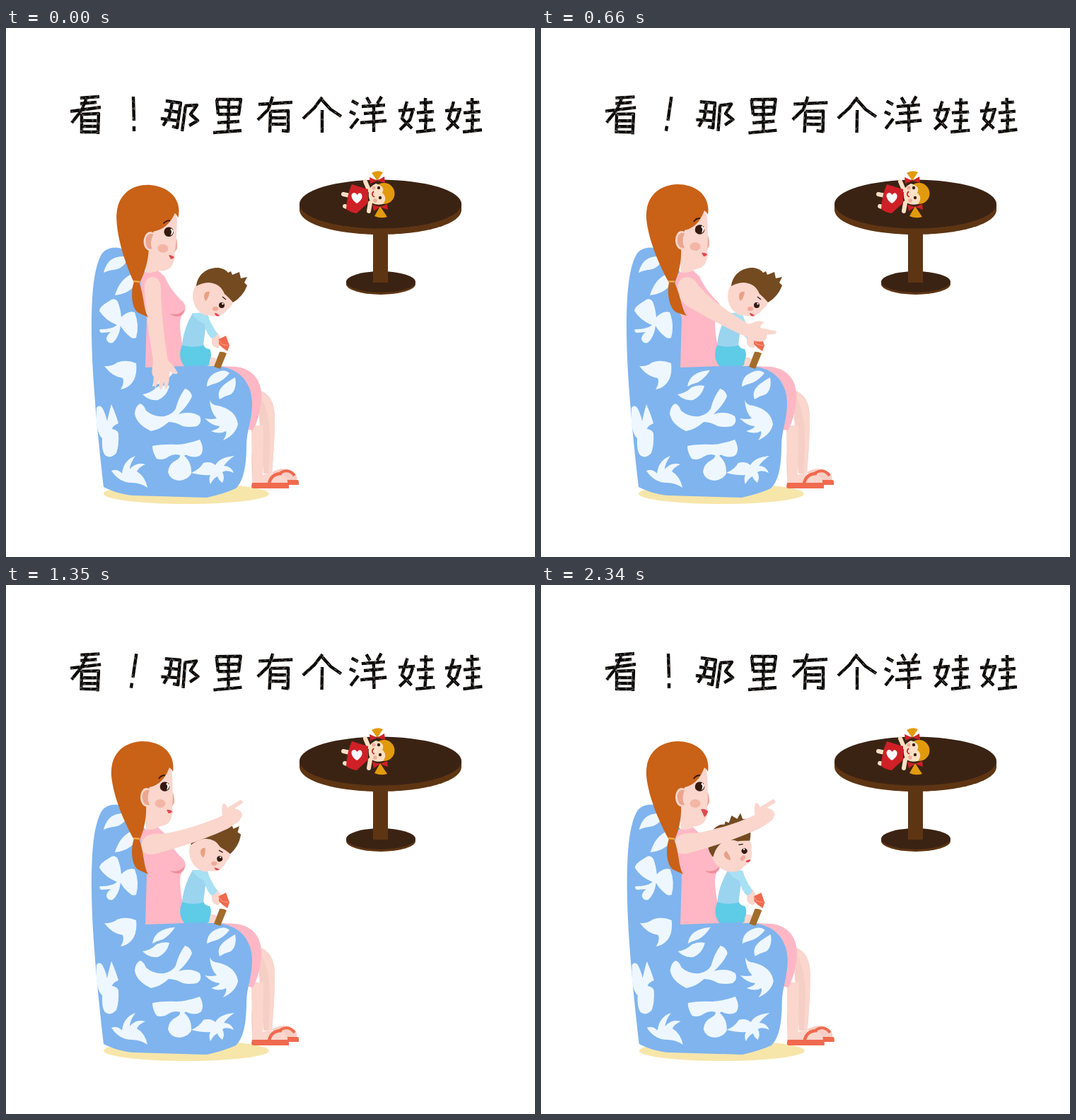
An HTML page for the animation above (2700 ms loop, 748 by 748 pixels).

```html
<!DOCTYPE html>
<html lang="zh">
<head>
<meta charset="utf-8">
<title>看！那里有个洋娃娃</title>
<style>
html, body { margin: 0; width: 100%; height: 100%; overflow: hidden; background: #fff; }
svg { display: block; width: 100vw; height: 100vh; }
.skin { fill: #fad6cd; }
.shade { fill: #f5cfc5; }
.pink { fill: #ffb7c5; }
.hair { fill: #c96117; }
.leaf { fill: #eef7ff; }
.sole { fill: #f06a4e; }
.wood { fill: #5e3513; }
.dark { fill: #3b2314; }
.gold { fill: #e29a0d; }
.red { fill: #cf2027; }
.doll { fill: #fbe0c4; }
.ink { fill: none; stroke: #0b0908; stroke-width: 4.4; stroke-linejoin: round; }
.fleck { fill: none; stroke: #8c847c; stroke-width: .9; }
</style>
</head>
<body>
<svg viewBox="0 0 748 748" role="img" aria-label="看！那里有个洋娃娃">
  <g id="words"></g>

  <g id="table">
    <ellipse class="wood" cx="530" cy="362" rx="49" ry="15"/>
    <ellipse class="dark" cx="530" cy="359" rx="49" ry="15"/>
    <path class="wood" d="M519 280H540V360H519Z"/>
    <path class="wood" d="M415 249V258C417 278 468 292 529.500 292S642 278 644 258V249Z"/>
    <ellipse class="dark" cx="529.5" cy="249" rx="114.500" ry="34.500"/>
  </g>
  <g id="doll">
    <g fill="none" stroke="#fbe0c4" stroke-width="6" stroke-linecap="round">
      <path d="M477 235L486 237M479 252L486 254M508 217L513 229M513 259L515 247"/>
    </g>
    <path class="red" d="M489 221L512 228V247L496 262Q487 261 481 256Q482 236 489 221Z"/>
    <path fill="#fff" d="M496 248C488 243 486 234 492 233Q495 233 496.500 236Q499 232 502 234C506 238 502 245 496 248Z"/>
    <path class="gold" d="M525 216L517 205Q525 200 533 204ZM529 252L521 266Q530 270 539 267Z"/>
    <circle class="gold" cx="534.500" cy="234" r="15"/>
    <path class="doll" d="M523 220Q537 224 532 233Q540 240 533 249Q519 252 514 243Q509 226 523 220Z"/>
    <path class="red" d="M525 216L514 211L515 220ZM525 216L535 210L536 219ZM529 253L518 250L520 259ZM529 253L539 249L540 257Z"/>
    <g fill="#42200f"><circle cx="527" cy="226" r="2.200"/><circle cx="529" cy="240" r="2.200"/></g>
    <g fill="#f3ab98"><circle cx="520" cy="226" r="2.600"/><circle cx="522" cy="244" r="2.800"/></g>
    <path d="M520 231Q515 236 521 239" fill="none" stroke="#c9252b" stroke-width="1.800"/>
  </g>

  <g id="seat">
    <ellipse cx="255" cy="658.500" rx="117" ry="14.500" fill="#f7e6aa"/>
    <path class="shade" d="M355 512C372 514 380 530 380 550C380 580 378 605 376 630H364Z"/>
    <path class="skin" d="M362 515C375 520 380 535 380 550C380 580 378 605 376 630H371C374 590 376 550 362 525Z"/>
    <path class="skin" d="M347 562H364L363 632Q378 625 396 643H348Z"/>
    <path class="shade" d="M347 600Q351 622 349 643H348Z"/>
    <path class="shade" d="M376 628Q394 618 408 629Q413 635 411 640H384Z"/>
    <path class="sole" d="M386 639H412Q414 639 414 642V646H394Z"/>
    <path d="M388 629Q400 622 408 633" fill="none" stroke="#f06a4e" stroke-width="4"/>
    <path class="skin" d="M348 644V628Q363 634 374 632Q391 624 398 640V644Z"/>
    <path class="sole" d="M348 643H397Q400 643 400 646V651H350Q347 651 347 648Z"/>
    <path d="M372 644Q375 630 390 630" fill="none" stroke="#f06a4e" stroke-width="4.500"/>
    <path class="pink" d="M280 477L325 479C349 482 361 498 361 520C361 542 354 560 349 569L338 567Z"/>
    <path fill="#7fb4ee" d="M138 649C130 580 121 490 121 425C121 370 125 340 134 322C140 310 156 307 170 315L201 350L198 480C225 474 270 475 298 478C330 481 347 500 348 530C348 555 340 570 340 590C340 615 337 640 325 651Q310 658 284 664L180 661C165 660 150 655 138 649Z"/>
    <g class="leaf">
      <path d="M138 346C143 328 152 322 170 323C173 328 169 334 163 338C157 343 148 341 138 346Z"/>
      <path d="M154 378C160 358 172 348 185 346C187 362 178 375 154 378Z"/>
      <path d="M146 386Q153 380 158 387Q162 397 163 409Q173 399 182 402Q189 420 184 438Q179 440 176 437Q166 429 162 421Q160 437 151 445Q144 447 142 440Q142 435 148 430L135 431Q131 429 133 426Q150 426 157 420Q140 413 132 400Q132 394 146 386Z"/>
      <path d="M139 478Q150 479 157 473Q170 468 184 474Q186 492 178 502Q171 510 162 511Q168 502 165 495Q150 493 139 478Z"/>
      <path d="M128 537Q134 530 139 543Q142 550 143 556Q146 542 149 532Q156 548 159 559Q151 562 150 567Q157 568 159 573Q160 590 156 601Q148 610 140 604Q135 598 136 580Q126 572 128 537Z"/>
      <path d="M149 626Q158 623 164 630Q166 611 183 605Q175 616 175 624Q184 613 197 617Q188 621 185 627Q197 634 200 650Q190 643 178 643Q160 643 149 626Z"/>
      <path d="M193 518Q205 516 213 508Q222 504 231 506Q228 520 215 526Q203 528 193 518Z"/>
      <path d="M207 507Q210 486 239 484Q232 495 222 501Q214 503 207 507Z"/>
      <path d="M182 545Q183 534 190 531Q195 533 198 541Q210 551 224 549Q236 546 240 538Q244 522 253 510Q262 513 263 521Q258 533 244 546Q262 541 274 549Q278 558 270 563Q260 565 250 563Q240 557 230 557Q218 568 205 570Q184 560 182 545Z"/>
      <path d="M284 507Q284 490 303 485Q311 483 316 488Q308 498 298 502Q290 504 284 507Z"/>
      <path d="M302 525Q297 513 310 503Q317 498 324 494Q327 510 318 518Q310 520 302 525Z"/>
      <path d="M288 526Q290 533 300 534Q325 540 328 560Q325 575 307 583Q313 574 311 570Q302 575 290 570Q303 566 302 563Q292 563 281 552Q290 554 298 552Q289 543 288 526Z"/>
      <path d="M207 591Q222 588 242 589Q258 588 274 582Q281 595 276 603Q270 609 258 605Q254 602 252 605Q263 614 262 630Q257 639 245 640Q232 639 229 628Q230 616 241 611Q247 607 246 604Q238 601 230 606Q222 612 213 609Q207 600 207 591Z"/>
      <path d="M262 629Q274 624 279 615Q289 612 296 618Q302 607 323 605Q314 611 308 619Q318 619 322 629Q312 624 306 628Q310 636 306 643Q301 640 299 634Q293 637 289 645Q286 638 289 632Q278 633 262 629Z"/>
    </g>
  </g>

  <g id="mum">
    <path class="skin" d="M196 315H216V344Q210 352 198 350Z"/>
    <path class="pink" d="M196 345Q205 348 215 343L224 351C230 365 240 378 250 387C256 393 254 402 249 406C243 414 247 440 256 478L197 480L199 410C194 395 190 370 190 352Z"/>
    <path d="M232 404Q246 407 253 397Q251 406 244 408Q236 408 232 404Z" fill="#ee8f9b"/>
    <g id="head">
      <path class="skin" d="M231 255C237 265 235 285 236 294Q238 302 238 307Q236 310 235 314L236 321Q234 330 231 335Q225 342 212 341L198 338L196 285L215 270Z"/>
      <path d="M236 293Q239 303 238 308L235 313Z" fill="#eeb09f"/>
      <path class="hair" d="M236 264C240 238 220 221 193 221C165 222 147 240 149 270C152 300 167 335 181 360H189C196 345 199 325 198 312L203 286C212 284 224 278 231 258Q234 260 236 264Z"/>
      <path class="skin" d="M203 288C194 284 190 293 190 301C191 312 198 316 204 312Z"/>
      <path d="M203 290C195 288 192 295 193 302C194 310 199 312 203 311Q198 302 203 290Z" fill="#eaa68f"/>
      <ellipse cx="218" cy="309" rx="7.500" ry="6" fill="#f3b5a5"/>
      <circle cx="224.500" cy="285" r="6.800" fill="#35190f"/>
      <path d="M231 282Q231 288 227 290Q229 286 228 282Z" fill="#fff"/>
      <circle cx="228" cy="281.500" r="1.400" fill="#fff"/>
      <path d="M216 274Q219 269 225 269" fill="none" stroke="#35190f" stroke-width="1.800"/>
      <path id="lips" fill="#de4a50"/>
    </g>
  </g>

  <g id="kid">
    <path class="skin" d="M285 467Q294 464 298 468L295 478H285Z"/>
    <path fill="#5ecbe7" d="M249 448Q268 452 279 447Q281 454 288 454Q292 462 288 470L287 477L252 478Q242 466 249 448Z"/>
    <path class="skin" d="M291 436L299 431Q306 440 305 446L300 453Q291 450 291 445Z"/>
    <path fill="#9bd4ef" d="M264 403L285 404Q281 432 279 449Q262 453 249 448Q251 425 264 403Z"/>
    <path fill="#a8e0f4" d="M263 404Q274 401 285 404Q288 417 299 432Q296 438 291 439Q284 434 280 418Q270 414 263 404Z"/>
    <path class="sole" d="M301 440L311 435L316 449L313 457L306 452L301 447Z"/>
    <path d="M300 440L305 447L314 449" fill="none" stroke="#f9a48c" stroke-width="1"/>
    <path fill="#a36c2b" d="M302 458Q306 457 312 460L303 482L294 479Z"/>
    <g id="kidHead">
      <path class="skin" d="M268 364C261 376 264 395 275 402Q279 407 287 406C298 410 308 406 313 398Q320 394 321 387L309 362L285 356Z"/>
      <path fill="#744a20" d="M269 365C271 347 286 338 301 339Q311 341 314 346L318 344L320 349L330 345L332 354L341 352L337 360L341 364Q335 380 321 388Q314 380 309 376Q303 361 287 360Q278 360 269 365Z"/>
      <path fill="#e7a183" d="M288 373C280 371 278 379 282 386Q286 384 288 373Z"/>
      <circle cx="305" cy="392" r="4" fill="#35190f"/>
      <circle cx="306.500" cy="390" r="1.200" fill="#fff"/>
      <ellipse cx="296" cy="397" rx="4.200" ry="3" fill="#f3a897"/>
      <path d="M306 380L311 384" stroke="#35190f" stroke-width="1.300"/>
      <path fill="#de4a50" d="M295 403Q299 403 302 407Q296 409 295 403Z"/>
    </g>
  </g>

  <path id="arm" class="skin"/>
  <g id="tail">
    <path class="hair" d="M181 359C176 372 177 398 188 403L201 409C194 398 196 380 188 359Z"/>
    <path d="M180 358L189 359" stroke="#f2a93c" stroke-width="2.500"/>
  </g>
</svg>
<script>
const $ = id => document.getElementById(id);

// Brush lettering: turning centre, strokes and shift of each sign
const WA = "M567 104L560 128L574 142M576 114L571 130L557 144M555 117L578 115M585 106L603 105M593 99V121M581 120L605 118M584 131L604 130M594 122L593 144M580 147L607 144";
const SIGNS = [
  [112, "M105 99L132 97M105 107L128 105M91 118L134 112M114 99L107 116L93 134M107 121V149M107 122L131 121L130 150M109 131H128M109 139H128M107 147H131"],
  [181, "M180 97L181 131M181 139V146"],
  [246, "M226 103L247 106L242 141L235 139M224 116L244 119M219 128L243 131M235 105L231 125L222 138M253 110L270 109L261 122L271 131L259 138M254 110L249 146"],
  [314, "M297 101H332L329 122H300M298 101L300 122M301 112H329M315 102L314 146M299 134L330 132M293 148L333 145"],
  [380, "M357 108L405 105M377 97L371 115L356 130M374 118L373 148M374 118L399 117V146L390 145M376 127H396M376 136H396"],
  [446, "M447 98L436 113L420 128M447 102L459 115L474 125M447 116V148"],
  [512, "M489 103L498 108M486 118L494 122M487 142L498 128M510 98L515 107M531 97L525 107M503 111L536 109M506 121L534 119M501 134L538 131M520 110V147"],
  [581, WA],
  [647, WA, 66]
];
const TILT = [
  [0, 0, 0, 0, 0, 0, 0, 0, 0],
  [-1.5, 9, -3, 1.5, -1.5, -1, 1.5, -1, 1.5],
  [1, 10, -3.5, -1, 1, 1, -1, 1.5, -1]
];
$("words").innerHTML = SIGNS.map(([, d, dx = 0], i) => `<g><g transform="translate(${dx})">
  <path class="ink" d="${d}"/>
  <path class="fleck" d="${d}" transform="translate(1 1)" stroke-dasharray="3 9 1 6 4 13" stroke-dashoffset="${i * 5}"/>
  <path class="fleck" d="${d}" transform="translate(-1 -1)" stroke-dasharray="2 11 3 8" stroke-dashoffset="${i * 7}"/>
</g></g>`).join("");

const ARM = {
  hang: "M196 366C196 347 219 347 219 368C219 400 224 440 229 470Q238 478 243 488Q238 492 231 484Q232 500 227 511Q223 508 223 496Q223 506 219 512Q215 508 217 496Q214 504 211 509Q207 503 209 493Q205 490 207 480Q208 474 208 468C203 440 197 400 196 366Z",
  lap: "M194 366C194 349 214 349 219 363C228 380 240 395 258 412C272 421 285 428 293 433Q302 431 312 438Q307 444 305 447Q312 453 313 458Q309 461 303 455Q306 461 304 466Q298 462 296 458Q297 466 293 471Q288 462 288 452C265 445 240 430 225 413C210 398 200 385 194 366Z",
  low: "M194 366C196 348 214 350 221 360C240 377 270 392 300 404Q306 404 311 399Q318 396 323 399Q317 403 319 407L341 408Q344 411 339 413L329 415Q331 421 326 425Q318 429 306 424C270 415 235 402 210 392C198 385 194 376 194 366Z",
  high: "M192 370C191 354 206 350 222 352C250 347 280 338 306 326Q304 315 307 309Q311 308 313 315L331 304Q335 304 335 308L323 316Q333 318 334 325Q332 334 322 339Q314 345 308 347C280 360 240 373 212 380C198 383 192 378 192 370Z"
};
const LIPS = {
  calm: "M227 318Q232 317 235 320Q234 323 230 323Z",
  smile: "M226 317Q232 316 236 320Q235 325 231 328Z"
};

const POSES = [
  { t: 0, arm: "hang", head: 4.6, text: 0 },
  { t: 200, arm: "lap", turn: 19, head: 2.3, text: 2, tail: -4 },
  { t: 430, arm: "lap", text: 1, tail: -7, mouth: "smile" },
  { t: 660, arm: "low", turn: 9, text: 2, tail: -6 },
  { t: 890, arm: "low", text: 0, tail: -5, dx: .7, mouth: "smile" },
  { t: 1120, arm: "high", turn: 21, text: 1, kid: -5 },
  { t: 1350, arm: "high", text: 2, kid: -11 },
  { t: 1650, arm: "high", text: 0, kid: -48, dx: .7, reach: -3.5, mouth: "smile" },
  { t: 2010, arm: "high", text: 1, kid: -65, dx: -.8, reach: -4, mouth: "smile" },
  { t: 2340, arm: "high", text: 0, kid: -48, dx: .7, reach: -3.5, mouth: "smile" }
];
const LOOP = 2700;

const move = (id, value) => $(id).setAttribute("transform", value);

function draw(ms) {
  const p = POSES.findLast(q => q.t <= ms % LOOP);
  const { dx = 0, turn = 0, head = 0, kid = 0, tail = 0, reach = 0, mouth = "calm" } = p;
  [...$("words").children].forEach((g, i) =>
    g.setAttribute("transform", `rotate(${TILT[p.text][i]} ${SIGNS[i][0]} 122)`));
  move("seat", `translate(${dx})`);
  move("mum", `translate(${Math.min(dx, 0)})`);
  move("kid", `translate(${dx / 2})`);
  move("head", `rotate(${head} 187 358)`);
  move("kidHead", `rotate(${kid} 278.3 404)`);
  move("tail", `rotate(${tail} 185 358)`);
  move("arm", `translate(${reach} ${reach / 4}) rotate(${turn} 207 362)`);
  $("arm").setAttribute("d", ARM[p.arm]);
  $("lips").setAttribute("d", LIPS[mouth]);
}

const start = performance.now();
function tick() {
  draw(performance.now() - start);
  requestAnimationFrame(tick);
}
tick();
</script>
</body>
</html>
```
